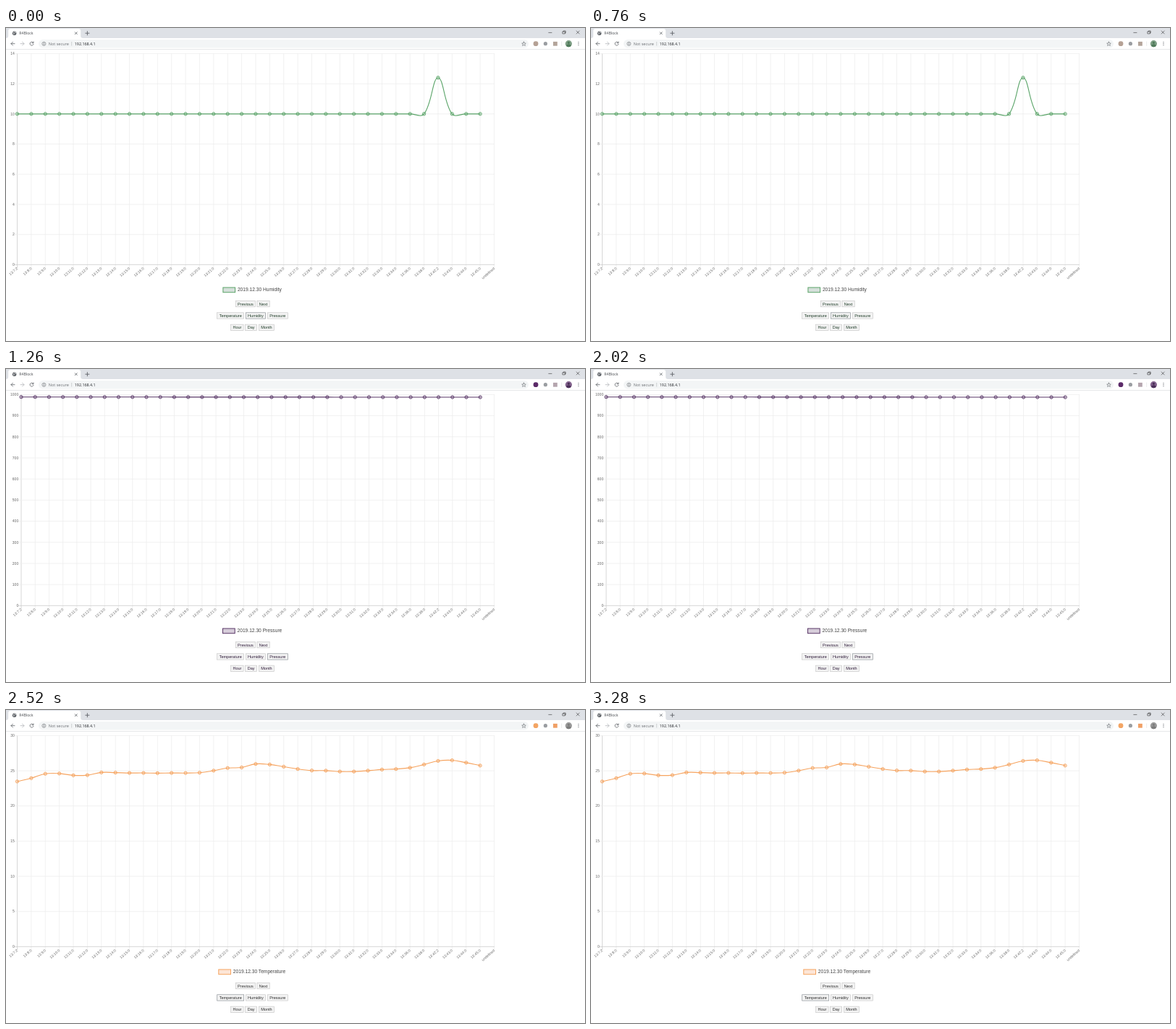
An HTML page for the animation above (3780 ms loop, 800 px wide and 433 px high).

```html
<!DOCTYPE html>
<html lang="en">
<head>
<meta charset="utf-8">
<title>Sensor chart</title>
<style>
html, body { margin: 0; width: 100%; height: 100%; overflow: hidden; background: #fff; }
svg { display: block; width: 100%; height: 100%; }
text { font-family: Arial, "Liberation Sans", sans-serif; }
.ui { font-family: "Open Sans", sans-serif; }
.line { fill: none; stroke-linecap: round; stroke-linejoin: round; }
</style>
</head>
<body>
<svg id="stage" viewBox="0 0 800 433" xmlns="http://www.w3.org/2000/svg"></svg>
<script>
const HOLD = 1260;
const TOP = 35.4, BOTTOM = 327.4, RIGHT = 674.5, COUNT = 34, TICK = 4.2;

const temps = [
  23.48, 23.95, 24.57, 24.61, 24.35, 24.38, 24.76, 24.74, 24.69, 24.69, 24.66, 24.69,
  24.68, 24.73, 25.02, 25.39, 25.47, 25.97, 25.89, 25.58, 25.25, 25.04, 25.02, 24.89,
  24.89, 25.02, 25.17, 25.25, 25.43, 25.89, 26.4, 26.49, 26.15, 25.74
];
const series = fn => Array.from({ length: COUNT }, (_, i) => fn(i));

const scenes = [
  { name: 'Humidity', left: 15.5, max: 14, step: 2, data: series(i => i === 30 ? 12.4 : 10),
    color: '#5aa468', fill: '#d5dfda', ink: '#1d3a26', legendX: 319.9,
    badge: '#b5a195', square: '#b3a49a', avatar: '#7f9f86', head: '#4f7a5a' },
  { name: 'Pressure', left: 21, max: 1000, step: 100, data: series(i => 988.6 - i * 0.03),
    color: '#5a3868', fill: '#d6ccd9', ink: '#2a1735', legendX: 319.5,
    badge: '#5b2a68', square: '#b5a5ae', avatar: '#84648e', head: '#4a2f58' },
  { name: 'Temperature', left: 15.5, max: 30, step: 5, data: temps,
    color: '#f6a460', fill: '#fde5d6', ink: '#2a2a2a', legendX: 313.8,
    badge: '#f3a564', square: '#f0a066', avatar: '#9a9a9a', head: '#7c7c7c' }
];

const minutes = [...series(i => i + 7).slice(0, 28), 36, 38, 42, 43, 44, 45];
const labels = minutes.map(m => `13:${m}:${m === 7 || m === 42 ? 2 : 0}`).concat('undefined');

// label, x, y, width
const buttons = [
  ['Previous', 317.2, 377.2, 27.4], ['Next', 346.6, 377.2, 17.9],
  ['Temperature', 291.4, 393.5, 37.6], ['Humidity', 331, 393.5, 27.8], ['Pressure', 361, 393.5, 28.6],
  ['Hour', 310.4, 409.8, 18], ['Day', 330.4, 409.8, 16.6], ['Month', 349, 409.8, 21.8]
];

const num = v => +v.toFixed(2);
const text = (s, x, y, size, fill, more = '') =>
  `<text x="${num(x)}" y="${num(y)}" font-size="${size}" fill="${fill}" ${more}>${s}</text>`;
const rect = (x, y, w, h, fill, more = '') =>
  `<rect x="${num(x)}" y="${num(y)}" width="${num(w)}" height="${num(h)}" fill="${fill}" ${more}/>`;
const circle = (x, y, r, fill, more = '') =>
  `<circle cx="${num(x)}" cy="${num(y)}" r="${r}" fill="${fill}" ${more}/>`;
const stroke = (d, color, width) =>
  `<path class="line" d="${d}" stroke="${color}" stroke-width="${width}"/>`;

function browser(s) {
  const dark = '#5f6368';
  return rect(0, 0, 800, 14, '#dee1e6')
    + '<path d="M0 14Q3.2 14 3.2 11V4Q3.2 1 6.4 1H100Q103.2 1 103.2 4V11Q103.2 14 106.4 14Z" fill="#fff"/>'
    + rect(0, 29, 800, 0.8, '#e0e2e4')
    + circle(11.6, 7.2, 2.8, dark)
    + stroke('M9.8 6.3L11.2 7.2L10.8 8.6M11.8 5.2L13.4 6.4', '#fff', 0.8)
    + text('R4Block', 18.3, 9, 5.2, '#45484c', 'class="ui"')
    + stroke('M95.3 5.7l3 3m0 -3l-3 3', dark, 0.8)
    + stroke('M109.8 7.2h5.2m-2.6 -2.6v5.2', dark, 0.9)
    + stroke('M749.8 6.4h4.2', '#333', 0.6)
    + stroke('M769.3 4.9h3v3h-3zM770.2 4.9v-0.9h3v3h-0.9', '#333', 0.6)
    + stroke('M788.2 4l4 4m0 -4l-4 4', '#333', 0.6)
    + stroke('M12 21.7H7m2.4 -2.4L7 21.7l2.4 2.4', dark, 0.8)
    + stroke('M20 21.7h5m-2.4 -2.4l2.4 2.4l-2.4 2.4', '#b4b7ba', 0.8)
    + stroke('M37.6 20.2A2.5 2.5 0 1 0 38 22.4M38 19v1.8h-1.9', dark, 0.8)
    + rect(45, 16, 677, 11.6, '#f3f5f6', 'rx="5.8"')
    + circle(52.4, 21.8, 2.5, 'none', `stroke="${dark}" stroke-width="0.6"`)
    + stroke('M52.4 21.6v1.5M52.4 20.4v0.1', dark, 0.7)
    + text('Not secure', 58.8, 23.7, 5.55, '#6b6f73', 'class="ui"')
    + rect(90.6, 19, 0.5, 5.6, '#a9acb0')
    + text('192.168.4.1', 94.8, 23.7, 5.35, '#222529', 'class="ui"')
    + stroke('M715.5 19.1l0.8 1.9l2 0.2l-1.5 1.3l0.5 2l-1.8 -1.1l-1.8 1.1l0.5 -2l-1.5 -1.3l2 -0.2z', dark, 0.6)
    + circle(732, 21.7, 3.4, s.badge)
    + circle(745.4, 21.7, 2.6, '#9a9da1')
    + rect(756, 18.9, 5.8, 5.8, s.square)
    + rect(767.6, 18.5, 0.5, 6.5, '#d3d5d8')
    + circle(777.4, 21.7, 4.6, s.avatar)
    + circle(777.4, 20.3, 1.6, s.head)
    + `<path d="M774.2 24.9Q774.2 22.3 777.4 22.3T780.6 24.9Q777.4 27.4 774.2 24.9Z" fill="${s.head}"/>`
    + [19.6, 21.7, 23.8].map(y => circle(791, y, 0.6, dark)).join('');
}

// Cubic spline with tension 0.4, handles weighted by neighbour distance.
function spline(pts) {
  const clamp = y => Math.min(BOTTOM, Math.max(TOP, y));
  const handles = pts.map((p, i) => {
    const a = pts[i - 1] || p, b = pts[i + 1] || p;
    const da = Math.hypot(p[0] - a[0], p[1] - a[1]);
    const db = Math.hypot(b[0] - p[0], b[1] - p[1]);
    const ka = 0.4 * da / (da + db), kb = 0.4 * db / (da + db);
    const dx = b[0] - a[0], dy = b[1] - a[1];
    return [p[0] - ka * dx, clamp(p[1] - ka * dy), p[0] + kb * dx, clamp(p[1] + kb * dy)].map(num);
  });
  return pts.map((p, i) => {
    const end = p.map(num).join(' ');
    if (!i) return 'M' + end;
    const [, , x1, y1] = handles[i - 1], [x2, y2] = handles[i];
    return `C${x1} ${y1} ${x2} ${y2} ${end}`;
  }).join('');
}

function chart(s) {
  const xAt = i => s.left + i * (RIGHT - s.left) / COUNT;
  const yAt = v => BOTTOM - v / s.max * (BOTTOM - TOP);
  const grid = '#ececec', axis = '#cacaca';
  let out = '';
  labels.forEach((label, i) => {
    const x = xAt(i);
    out += stroke(`M${num(x)} ${TOP}V${BOTTOM + TICK}`, i ? grid : axis, 0.75)
      + text(label, 0, 1.7, 5, '#6a6a6a', `text-anchor="end" transform="translate(${num(x)} 332) rotate(-41)"`);
  });
  for (let v = 0; v <= s.max; v += s.step) {
    const y = yAt(v);
    out += stroke(`M${s.left - TICK} ${num(y)}H${RIGHT}`, v ? grid : axis, 0.75)
      + text(v, s.left - TICK + 0.4, y + 1.75, 5, '#666', 'text-anchor="end"');
  }
  const pts = s.data.map((v, i) => [xAt(i), yAt(v)]);
  out += stroke(spline(pts), s.color, 1.1);
  for (const [x, y] of pts)
    out += circle(x, y, 2.15, s.color, `fill-opacity="0.2" stroke="${s.color}" stroke-width="0.9"`);
  return out
    + rect(s.legendX - 20, 359, 16.7, 6.7, s.fill, `stroke="${s.color}" stroke-width="1"`)
    + text('2019.12.30 ' + s.name, s.legendX, 364.4, 6.67, '#444');
}

function controls(s) {
  return buttons.map(([label, x, y, w]) => {
    const on = label === s.name;
    return rect(x + 0.3, y + 0.3, w - 0.6, 8.3, '#f3f3f3',
      `stroke="${on ? '#8d9399' : '#bdbdbd'}" stroke-width="${on ? 0.7 : 0.55}"`)
      + text(label, x + w / 2, y + 6.4, 5.55, s.ink, 'text-anchor="middle"');
  }).join('');
}

const stage = document.getElementById('stage');
let shown = -1;

function render(time) {
  const i = Math.floor(time / HOLD) % scenes.length;
  if (i === shown) return;
  shown = i;
  const s = scenes[i];
  stage.innerHTML = rect(0, 0, 800, 433, '#fff') + browser(s) + chart(s) + controls(s);
}

const start = performance.now();
function tick() {
  render(performance.now() - start);
  requestAnimationFrame(tick);
}
tick();
</script>
</body>
</html>
```
